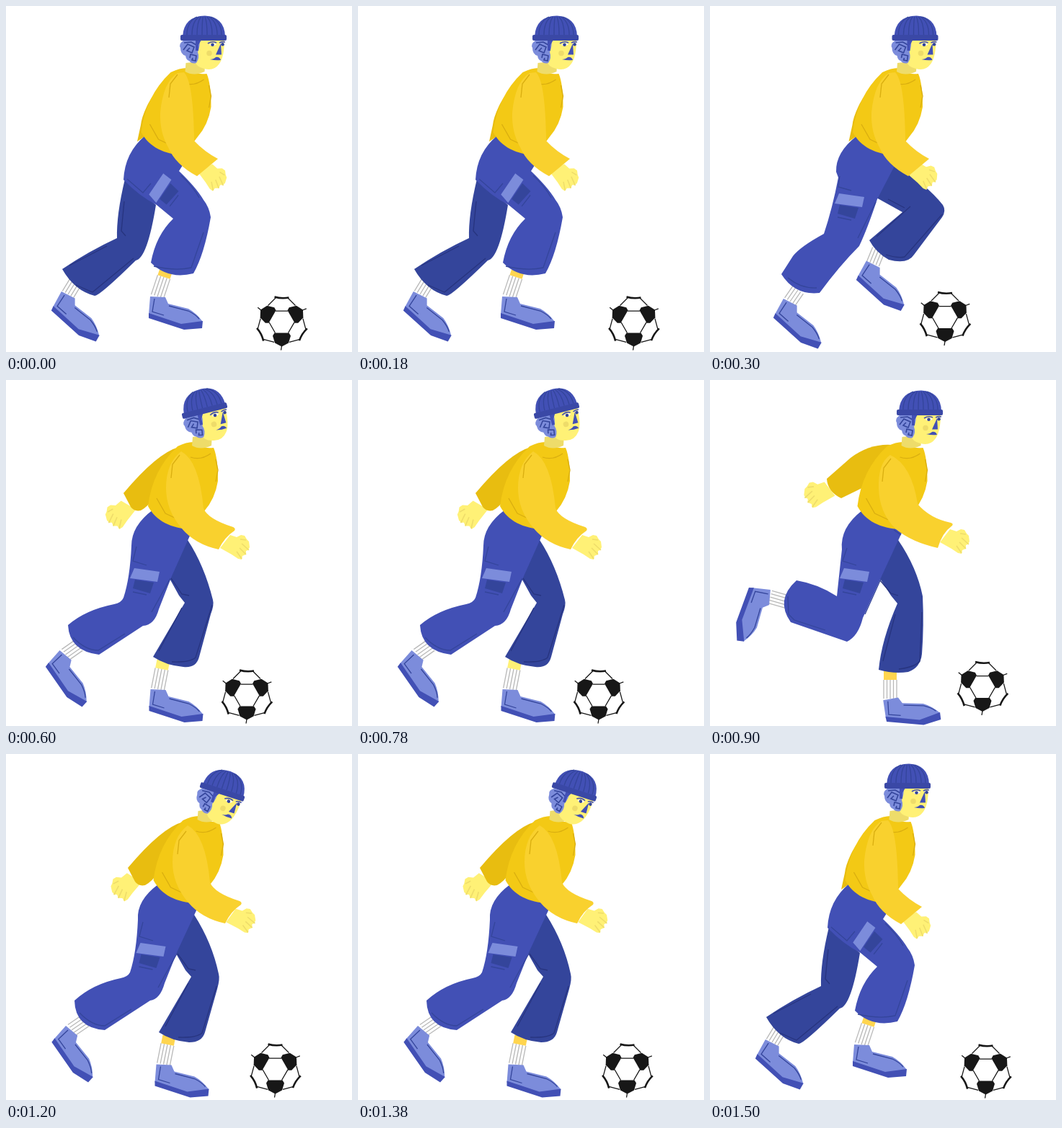
An HTML page that plays this animation: 480x480 px, repeating every 1800 ms.

```html
<!DOCTYPE html>
<html lang="en">
<head>
<meta charset="utf-8">
<title>Footballer</title>
<style>
html, body { margin: 0; width: 100%; height: 100%; overflow: hidden; background: #fff; }
svg { display: block; width: 100vw; height: 100vh; }
</style>
</head>
<body>
<svg id="stage" viewBox="0 0 480 480"></svg>
<script>
const BLUE = '#4250b5', BRIM = '#3a48a6', DARK = '#34459b', NAVY = '#27347f', PALE = '#7c8cdb';
const GOLD = '#f3c915', SLEEVE = '#f9d12e', SHADE = '#e8bd10', CREASE = '#d9ae10';
const SKIN = '#fff176', SHADOW = '#eedc6a', ANKLE = '#ffd54f', INK = '#171717';
const STEP = 300;

const fill = (d, color) => `<path d="${d}" fill="${color}"/>`;
const line = (d, color, width = 1.3) =>
  `<path d="${d}" fill="none" stroke="${color}" stroke-width="${width}"/>`;
const dot = (x, y, r, color) => `<circle cx="${x}" cy="${y}" r="${r}" fill="${color}"/>`;
const place = (content, x, y, turn = 0, scale = '1') =>
  `<g transform="translate(${x} ${y}) scale(${scale}) rotate(${turn})">${content}</g>`;

const ribs = [-23, -16, -9, -2, 5, 12, 19, 25]
  .map(x => line(`M${x * .4} -29Q${x} -22 ${x} -4`, DARK)).join('');

const head =
  fill('M-10 2L29 2Q29 26 22 36Q14 47 1 43Q-10 41 -14 30Z', SKIN) +
  fill('M-28 4Q-35 9 -32 14Q-32 23 -25 25Q-24 31 -20 32Q-16 37 -10 35Q-5 28 -8 20Q-4 10 -6 3Z', PALE) +
  line('M-28 17L-22 9L-13 13L-16 21L-23 18L-19 14M-19 28L-18 23L-10 25L-11 32L-16 31L-15 28M-27 7L-17 6L-10 10', DARK, 1.6) +
  fill('M-11 3H-3L-7 10L-7 18L-11 18Z', BLUE) +
  fill('M8 10Q12 5 18 9Q14 13 8 10M23 9Q26 5 29 8Q28 13 23 9', '#fff') +
  line('M6 8Q12 4 18 7M22 7Q26 5 30 6', BLUE, 1.6) +
  dot(12.5, 9.8, 2.3, DARK) + dot(26.5, 9.3, 2.3, DARK) + dot(8, 21.5, 3.8, SHADOW) +
  fill('M24 8L17 23.500L25 23.500Z', BLUE) +
  fill('M9 30Q14 30 17 27Q22 26 24 31Q17 32 9 30Z', BLUE) +
  fill('M-29 -2Q-27 -30 2 -30.500Q29 -29 30 -2Z', BLUE) + ribs +
  `<rect x="-32" y="-4" width="64" height="8" rx="2" fill="${BRIM}"/>`;

const hand =
  fill('M-8 9L6 -9L15 -6L21 -9L26 -8L29 -3L32 0L33 8L31 12L28 13L28 18L23 20L22 25L17 24L8 18Z', SKIN) +
  line('M15 14L22 24M19 9L28 18M22 3L32 12M20 -3L28 -2', SHADOW, 1.5);

const shoe =
  fill('M-10 0L11 1L15 10L43 17Q54 23 63 35L33 39L-12 25Z', PALE) +
  fill('M-12 23L33 38L63 34L62 44L37 46L-12 30Z', BLUE) +
  line('M-4 3L-7 21L9 26M16 13L43 20Q53 25 58 31', DARK);

const pocket =
  fill('M-14 7L12 11L7 26L-17 19Z', DARK) +
  fill('M-15 -9L20 -4L17 10L-21 5Z', PALE) +
  line('M-17 24L2 28', DARK);

const torso =
  fill('M238 92Q250 86 260 86Q270 96 288 94Q294 108 294 140Q290 165 275 182L256 207C230 206 208 196 197 175Q203 125 238 92Z', GOLD) +
  line('M256 107Q270 112 284 102M291 110L294 125L291 141M209 164L221 185L240 194', CREASE) +
  fill('M259 79L286 76L285 91Q270 98 258 91Z', SHADOW);

const sector =
  fill('M-10 15L10 15L12.500 19L9.500 29L0 34L-9.500 29L-12.500 19Z', INK) +
  line('M9 15L17.500 .3M0 33L-1 39M-8 -34L-19 -23M8 -34L19 -23', INK) +
  line('M-10 -35Q0 -32 10 -34', INK, 2.6);
const ball = [0, 120, 240].map(turn => place(sector, 0, 0, turn)).join('');

// Striped sock from the shoe opening (x, y) up to (tx, ty), then the bare ankle.
function foot([x, y, turn, tx, ty, ankle]) {
  const len = Math.hypot(tx - x, ty - y);
  const ux = (tx - x) / len, uy = (ty - y) / len;
  const stripes = [-9, -4.5, 0, 4.5, 9].map(k =>
    line(`M${x + uy * k} ${y - ux * k}L${tx + uy * k} ${ty - ux * k}`, '#b8b8b8')).join('');
  const bare = ankle ? line(`M${tx} ${ty}l${ux * 12} ${uy * 12}`, ankle, 18) : '';
  return bare + stripes + place(shoe, x, y, turn);
}

const tuckedArm = 'M230 98Q205 118 195 140Q188 155 187 165L182 188L194 180L220 140Z';
const bentArm = 'M247 92Q260 105 261 187Q275 202 294 212L265 236Q235 220 225 196Q213 175 214 148Q218 105 238 93Z';
const swungArm = 'M240 93Q210 101 163 157L173 176Q178 183 187 181Q205 172 222 130Z';
const openArm = 'M243 99Q268 112 274 178Q280 193 315 204Q319 206 317 209Q303 218 295 235Q262 228 243 205Q222 180 222 150Q222 115 243 99Z';

// farArm and nearArm: path, x, y; hands, head and pocket: x, y, turn.
const poses = [
  {
    dx: -9.5, head: [274, 44, 0], ball: [382.5, 438.5], fold: [-3, -9],
    farArm: [tuckedArm, 0, 0], nearArm: [bentArm, 0, 0], nearHand: [277, 225, 24],
    feet: [[86, 400, 24, 97, 382], [210, 403, 0, 219, 376, ANKLE]],
    farLeg: 'M165 240Q153 290 154 322Q115 340 78 365Q95 395 123 402Q130 402 180 353Q196 350 208 276Z',
    farSeams: 'M164 271L160 312L166 319M140 333L88 360M97 387L120 397L177 350',
    nearLeg: 'M193 180Q165 203 163 241Q185 264 209 276L232 295Q208 318 201 356Q225 380 260 371Q275 345 284 293Q282 279 274 269Q264 252 240 229L245 221L234 202Z',
    nearSeams: 'M168 240L190 259L201 246M243 235Q260 251 268 266M274 314L257 363Q235 368 205 361',
    pocket: [213, 252, -64]
  },
  {
    dx: 1, head: [284.5, 44, 0], ball: [326, 432], fold: [7, -9],
    farArm: [tuckedArm, 10.5, 0], nearArm: [bentArm, 10, 0], nearHand: [284, 226, 12],
    feet: [[226, 357.5, 24, 234, 338], [111, 410, 24, 122, 394]],
    farLeg: 'M255 220Q300 247 323 276Q328 284 322 293L283 345Q274 359 248 352Q230 342 221 325L267 286L231 266Z',
    farSeams: 'M247 268L270 280M278 278L231 320M244 345Q260 350 270 348L322 289',
    nearLeg: 'M204 180Q174 203 175 230L178 238Q170 280 158 316Q125 334 115 347L99 372Q118 402 152 398Q180 360 207 333Q218 310 232 268L258 218L240 202Z',
    nearSeams: 'M180 236L178 251L196 256M108 377Q126 392 148 391M230 272L205 322',
    pocket: [194, 269, 0]
  },
  {
    dx: 0, head: [275.5, 42.5, -14], ball: [334, 437.5], fold: [0, 0],
    farArm: [swungArm, 0, 0], farHand: [169, 174, 22], nearArm: [openArm, 0, 0], nearHand: [305, 224, 0],
    feet: [[82.5, 381, 37, 101, 368], [210.5, 429, 0, 216, 401, SKIN]],
    farLeg: 'M245 218L252 222Q275 257 287 305Q289 312 284 325L268 384Q264 400 246 398Q222 396 204 384L248 309L240 299L224 270Z',
    farSeams: 'M229 275L244 297L254 299M244 316L212 376M230 391Q255 392 263 385L286 312',
    nearLeg: 'M204 180Q174 202 174 230Q172 275 163 302Q160 309 150 311Q110 319 86 340Q88 376 129 381L190 341Q206 340 212 318L230 272L256 214L245 204Z',
    nearSeams: 'M181 231L176 251L195 257M93 357Q110 375 128 375L165 352M228 275L202 322',
    pocket: [193, 270, 0]
  },
  {
    dx: 7.5, head: [291, 45, 0], ball: [378, 426], fold: [10, 5],
    farArm: ['M252 90Q222 88 195 108L162 137Q163 155 182 164L225 143Z', 0, 0], farHand: [165, 151, 0],
    nearArm: ['M250 104Q280 118 288 172Q305 192 334 198Q338 199 336 202Q322 212 316 233Q280 225 258 207Q235 185 234 150Q233 115 250 104Z', 0, 0],
    nearHand: [327, 216, 0],
    feet: [[250, 442, -13, 250, 416, ANKLE], [83.5, 301, 92, 108, 308]],
    farLeg: 'M252 218L261 222Q287 260 295 300Q297 340 294 380Q292 399 275 405Q255 408 234 402Q238 360 260 310L251 299L233 271Z',
    farSeams: 'M236 278L251 296L261 299M257 325L240 390M262 401Q285 398 291 390L294 322',
    nearLeg: 'M211 181Q180 205 183 235L176 300Q150 283 120 278Q90 305 112 336L190 363Q206 355 212 330L240 268L266 212L252 203Z',
    nearSeams: 'M190 233L184 251L203 257M108 300L109 325L117 333L160 347M255 208L265 215M237 276L215 325',
    pocket: [201, 270, 0]
  },
  {
    dx: 7.5, head: [300, 52.5, 18], ball: [373.5, 437.5], fold: [9, 3],
    farArm: [swungArm, 6, 1], farHand: [177, 172, 20], nearArm: [openArm, 9, 0], nearHand: [313, 224, -2],
    feet: [[91, 383, 37, 110, 370], [218.5, 430.5, 0, 224, 403, ANKLE]],
    farLeg: 'M252 218L261 223Q286 262 295 305Q297 312 293 326L276 386Q272 400 254 400Q230 398 212 386L257 309L249 300L232 270Z',
    farSeams: 'M238 277L253 298L263 300M253 318L221 378M239 393Q264 394 272 387L292 322',
    nearLeg: 'M211 181Q181 203 183 230Q181 276 172 303Q169 309 159 311Q120 319 95 342Q96 380 137 383L200 342Q214 340 220 318L238 273L265 215L250 203Z',
    nearSeams: 'M190 233L185 253L204 259M102 359Q119 377 137 377L174 354M237 277L211 324',
    pocket: [201.5, 271, 0]
  }
];

function draw(p) {
  const arm = ([d, x, y], color) => place(fill(d, color), x, y);
  return (p.farHand ? place(hand, ...p.farHand, '-1.05 1.05') : '') +
    arm(p.farArm, SHADE) +
    p.feet.map(foot).join('') +
    fill(p.farLeg, DARK) + line(p.farSeams, NAVY) +
    fill(p.nearLeg, BLUE) + line(p.nearSeams, DARK) +
    place(pocket, ...p.pocket) +
    place(torso, p.dx, 0) +
    place(hand, ...p.nearHand) +
    arm(p.nearArm, SLEEVE) +
    place(line('M229 136L231 117L241 104', CREASE), ...p.fold) +
    place(head, ...p.head) +
    place(ball, ...p.ball);
}

const stage = document.getElementById('stage');
stage.innerHTML = poses.map(p => `<g display="none">${draw(p)}</g>`).join('');
const groups = [...stage.children];
const start = performance.now();

// Six beats per loop; the last beat holds the opening pose.
function tick() {
  const beat = Math.floor((performance.now() - start) / STEP) % 6 % poses.length;
  groups.forEach((g, i) => g.setAttribute('display', i === beat ? 'inline' : 'none'));
  requestAnimationFrame(tick);
}
tick();
</script>
</body>
</html>
```
